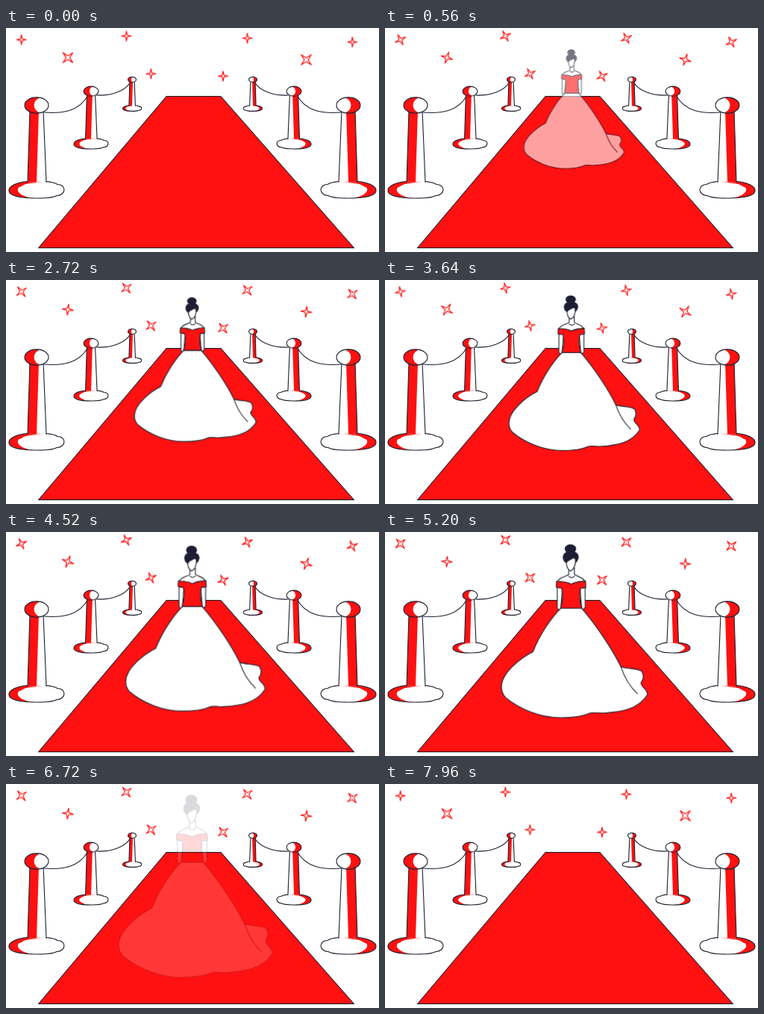
These frames come from a looping animation (500 by 300 pixels, 8 s). An HTML page:

```html
<!DOCTYPE html>
<html lang="en">
<head>
<meta charset="utf-8">
<title>Red carpet</title>
<style>
  html, body { margin: 0; width: 100%; height: 100%; overflow: hidden; background: #fff; }
  svg { display: block; width: 500px; height: 300px; }
  path, ellipse { vector-effect: non-scaling-stroke; }
  .line { stroke: #18202e; stroke-width: 1.1; stroke-linejoin: round; stroke-linecap: round; }
  .red { fill: #ff1111; }
  .white { fill: #fff; }
  .none { fill: none; }
  .hair { fill: #1d1d33; }
  #star { fill: #fff; stroke: #ff1111; stroke-width: 1.2; stroke-linejoin: round; }

  .fade { animation: fade 8s infinite; }
  .walk { transform-origin: 252px 55px; animation: walk 8s linear infinite; }
  .small, .big { animation: 2s ease-in-out infinite; }
  .small { animation-name: grow; }
  .big { animation-name: shrink; }

  @keyframes fade {
    0% { opacity: 0; animation-timing-function: ease-in-out; }
    12.5%, 75% { opacity: 1; animation-timing-function: ease-in-out; }
    87.5%, 100% { opacity: 0; }
  }
  @keyframes walk {
    0% { transform: scale(.623); }
    75%, 100% { transform: scale(1.0105); }
  }
  @keyframes grow {
    0%, 100% { transform: rotate(0deg) scale(1); }
    50% { transform: rotate(-45deg) scale(1.3); }
  }
  @keyframes shrink {
    0%, 100% { transform: rotate(45deg) scale(1.45); }
    50% { transform: rotate(0deg) scale(1.05); }
  }
</style>
</head>
<body>
<svg viewBox="0 0 500 300">
  <defs>
    <path id="star" d="M0-6.6 L1.2-1.2 L6.6 0 L1.2 1.2 L0 6.6 L-1.2 1.2 L-6.6 0 L-1.2-1.2Z"/>

    <!-- Post, origin at the centre of its base -->
    <g id="post">
      <path class="red" d="M-12-11 C-26-10 -38-5 -37 2 C-36 8 -22 11.5 0 11.5 C14 11.5 22 11 27 8 C33 8 37 4 37 0 C37-4 33-7 28-7 C24-10 18-10 13-11Z"/>
      <path class="white" d="M-12-8 C-18-7 -20-4 -24-3 C-27 1 -24 4 -21 6 C-15 10 -8 11.5 0 11.5 C14 11.5 22 11 27 8 C33 8 37 4 37 0 C37-4 33-7 28-7 C24-10 18-10 13-11Z"/>
      <path class="line none" d="M-12-11 C-26-10 -38-5 -37 2 C-36 8 -22 11.5 0 11.5 C14 11.5 22 11 27 8 C33 8 37 4 37 0 C37-4 33-7 28-7 C24-10 18-10 13-11"/>
      <path class="white" d="M-9-106 L-12-10 L13-10 L9-106Z"/>
      <path class="red" d="M-9-106 L-12-10 L0-10 L3-106Z"/>
      <path class="line none" d="M-9-106 L-12-10 M9-106 L13-10"/>
      <ellipse class="red" cy="-113" rx="16" ry="10.6"/>
      <ellipse class="white" cx="6.3" cy="-113" rx="9.7" ry="10"/>
      <ellipse class="line none" cy="-113" rx="16" ry="10.6"/>
    </g>

    <g id="barrier">
      <path class="line none" d="M50 113 C75 115 98 112 110 90 M121 90 C140 91 160 85 167 72"/>
      <use href="#post" transform="translate(169 107.5) scale(.34)"/>
      <use href="#post" transform="translate(114 154.8) scale(.62)"/>
      <use href="#post" transform="translate(41 216.5)"/>
    </g>
  </defs>

  <path class="line red" d="M215 91.5 H288 L466.5 294.5 H43.5Z"/>
  <use href="#barrier"/>
  <use href="#barrier" transform="matrix(-1 0 0 1 500 0)"/>

  <g transform="translate(20.7 15.7)"><g class="small"><use href="#star"/></g></g>
  <g transform="translate(161.4 10.8)"><g class="small"><use href="#star"/></g></g>
  <g transform="translate(194.4 61.3)"><g class="small"><use href="#star"/></g></g>
  <g transform="translate(323.5 13.7)"><g class="small"><use href="#star"/></g></g>
  <g transform="translate(464.3 18.8)"><g class="small"><use href="#star"/></g></g>
  <g transform="translate(291 64.5)"><g class="small"><use href="#star"/></g></g>
  <g transform="translate(83 39.7)"><g class="big"><use href="#star"/></g></g>
  <g transform="translate(402.5 42.5)"><g class="big"><use href="#star"/></g></g>

  <g class="fade">
    <g class="walk">
      <!-- Train and skirt -->
      <path class="line white" d="M235 104 C221 118 205 142 196 165 C180 173 152 194 152 214 C152 220 154 225 158 229 C176 244 205 257 235 257 C252 257 266 255 276 250.5 C283 249 289 251 295 250.5 C318 249 343 246 356 225 C356 216 347 215 347 208 C351 203 351 197 348 192 C342 188 330 189 319 186 C308 163 285.5 129 264 104Z"/>
      <path class="line none" d="M319 186 C325 204 333 215 342 223.5"/>
      <!-- Shoulders and arms -->
      <path class="line white" d="M246 48 V57 C242 60 231 61 230 68 L230 104 Q232 108 235 104 L237 78 H262 L264 104 Q267 107 269 103 L269 68 C268 61 258 60 254 57 V48Z"/>
      <path class="line none" d="M246 59.5 Q250 63 254 59.5"/>
      <!-- Bodice -->
      <path class="line red" d="M229 66.5 C236 67 243 66.5 249.5 70.5 C256 66.5 263 67 269.5 66 L270 75 Q266 76.5 263 75.5 C260.5 84 261 94 264.5 104 H234.5 C238 94 238.5 84 236 75.5 Q232 76.5 228.5 74.5Z"/>
      <!-- Head -->
      <path class="line white" d="M242.5 34 C242 44 244 50 248.5 52 C253 50 256 44 255.5 34Z"/>
      <ellipse class="hair" cx="248.4" cy="21.3" rx="8" ry="6.5"/>
      <path class="hair" d="M237.7 33 C238 27 243 24.5 249 24.5 C256 24.5 260.3 28 260 33 C259.5 37 257.5 39.5 255.3 41 C256 37 255 35 253 33.5 C250 37 245 37 243 41.5 C240 40 237.7 37 237.7 33Z"/>
    </g>
  </g>
</svg>
</body>
</html>
```
